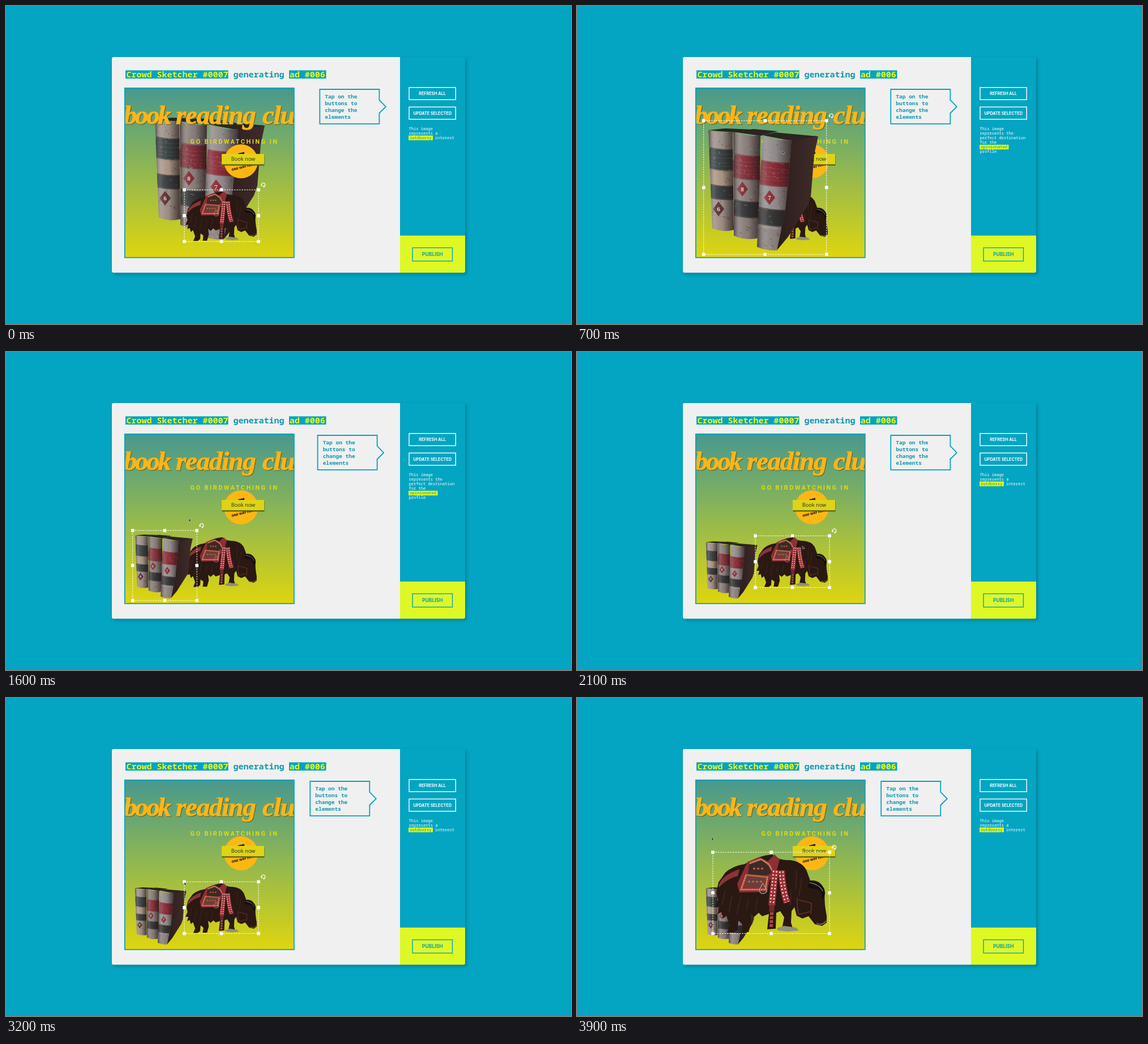
Write an HTML page that moves like this. It is 998x561 px and loops after 4900 ms.

```html
<!DOCTYPE html>
<html lang="en">
<head>
<meta charset="utf-8">
<title>Ad generator</title>
<style>
  html, body { margin: 0; width: 100%; height: 100%; overflow: hidden; background: #03a5c2; }
  svg { display: block; width: 998px; height: 561px; }
  .mono { font-family: "Noto Sans Mono", monospace; }
  .head { font-size: 15px; font-weight: 700; }
  .tip { font-size: 9.5px; font-weight: 700; fill: #1298ad; }
  .note { font-size: 7.1px; fill: #fff; }
  .ui { font-family: Inter, sans-serif; font-size: 7.2px; font-weight: 700; fill: #fff; text-anchor: middle; }
  .script { font: italic 700 47px "Liberation Serif", serif; fill: #fbb51a; stroke: #fbb51a; stroke-width: 1;
    letter-spacing: -1.2px; filter: drop-shadow(1.2px 1.3px 0 #55622a); }
  .sub { font: 700 11px Roboto, sans-serif; letter-spacing: 2.43px; fill: #e0d913; }
  .cta { font: 400 9.2px "Open Sans", sans-serif; fill: #26301c; text-anchor: middle; }
  .num { font: 700 11px "Liberation Serif", serif; fill: #e8dcd2; text-anchor: middle; }
  .panel { filter: drop-shadow(3px 3px 2.5px rgba(0, 40, 50, .28)); }
  .line { fill: none; stroke: #03a3bf; }
</style>
</head>
<body>
<svg viewBox="0 0 998 561">
  <defs>
    <linearGradient id="sky" x2="0" y2="1">
      <stop stop-color="#47988f"/><stop offset=".5" stop-color="#93b84f"/><stop offset="1" stop-color="#dfd50f"/>
    </linearGradient>
    <linearGradient id="shade">
      <stop stop-color="#1c1010" stop-opacity=".62"/><stop offset=".3" stop-color="#fff" stop-opacity=".08"/>
      <stop offset=".55" stop-color="#1c1010" stop-opacity=".06"/><stop offset="1" stop-color="#1c1010" stop-opacity=".72"/>
    </linearGradient>
    <linearGradient id="cover"><stop stop-color="#2b1c1b"/><stop offset="1" stop-color="#402d2a"/></linearGradient>
    <clipPath id="frame"><path d="M210 145H508V443H210Z"/></clipPath>
  </defs>

  <g class="panel">
    <rect x="187" y="90" width="624" height="380.5" rx="3" fill="#03a5c2"/>
    <path d="M190 90H696V470.5H190Q187 470.5 187 467.5V93Q187 90 190 90Z" fill="#f0f0f0"/>
    <path d="M696 405H811V467.5Q811 470.5 808 470.5H696Z" fill="#def826"/>
  </g>

  <g class="mono head">
    <path d="M211 113.5H392.5V128H211ZM500 113.5H565.5V128H500Z" fill="#03a3bf"/>
    <text x="212.5" y="126" fill="#e6fa1e">Crowd Sketcher #0007</text>
    <text x="401.5" y="126" fill="#1298ad">generating</text>
    <text x="500.7" y="126" fill="#e6fa1e">ad #006</text>
  </g>

  <g id="tip">
    <path class="line" stroke-width="1.8" d="M.9 147H106V166L117.5 177.7L106 189V207.8H.9Z"/>
    <g class="mono tip">
      <text x="10" y="163">Tap on the</text><text x="10" y="175">buttons to</text>
      <text x="10" y="187">change the</text><text x="10" y="199">elements</text>
    </g>
  </g>

  <g fill="none" stroke="#fff" stroke-width="1.4">
    <rect x="712" y="143.7" width="82.3" height="21.6"/><rect x="712" y="178.2" width="82.3" height="21.6"/>
    <rect x="718" y="426.5" width="70.5" height="23.5" stroke="#03a3bf"/>
  </g>
  <text class="ui" x="753" y="157.3">REFRESH ALL</text>
  <text class="ui" x="753.3" y="191.8">UPDATE SELECTED</text>
  <text class="ui" x="753.3" y="441.4" style="font-size:8.5px;fill:#0d9fae">PUBLISH</text>

  <g class="mono note">
    <text x="711.5" y="218.5">This image</text>
    <g id="noteYak">
      <text x="711.5" y="226.7">represents a</text>
      <path d="M711 228.5H754V236.8H711Z" fill="#e2fa1c"/>
      <text x="713.3" y="234.9" fill="#178f80">outdoorsy</text><text x="757.7" y="234.9">interest</text>
    </g>
    <g id="noteBooks">
      <text x="711.5" y="226.7">represents the</text><text x="711.5" y="234.9">perfect destination</text>
      <text x="711.5" y="243">for the</text>
      <path d="M711 244.8H762.5V253H711Z" fill="#e2fa1c"/>
      <text x="713.3" y="251.2" fill="#178f80">opinionated</text><text x="711.5" y="259.3">profile</text>
    </g>
  </g>

  <g clip-path="url(#frame)">
    <rect x="209" y="144" width="300" height="300" fill="url(#sky)"/>
    <g id="layers">
      <g id="copy">
        <g class="script">
          <text x="208" y="208" style="letter-spacing:-3.4px">book</text>
          <text x="300" y="208">reading</text><text x="453" y="208">club</text>
        </g>
        <text class="sub" x="325.5" y="242.5">GO BIRDWATCHING IN</text>
        <circle cx="415" cy="274" r="30" fill="#fdb714"/>
        <path d="M410 260L421 257.5L421 262H410Z" fill="#2a2112"/>
        <text transform="translate(399 291) rotate(-14)" style="font:800 5.6px 'Open Sans',sans-serif" fill="#2a2112">ONE WAY FARE</text>
        <path d="M381.5 263H456.5V281.5H381.5Z" fill="#5f6015"/>
        <path d="M381 261H456V279.3H381Z" fill="#dfd318"/>
        <text class="cta" x="419" y="273.3">Book now</text>
      </g>
      <g id="books"></g>
      <g id="yak">
        <path fill="#2a1813" d="M262 308Q275 296 296 293Q320 278 345 276Q357 287 376 286Q396 288 405 303L412 322Q426 320 434 332L438 343Q436 360 441 384L441 396L433 402L420 399L409 385L398 389L388 384L384 369L379 376L378 396L381 406L362 407L366 387L359 376L352 379L351 407L336 408L339 381L327 385L321 379L313 386L306 380L308 396L303 413L291 413L293 399L285 393L284 409L277 414L265 414L270 401L264 384L258 389L255 378L248 381L251 369L243 369L249 356L246 343L250 325Z"/>
        <path fill="none" stroke="#4a2f25" stroke-width="1" d="M262 338L256 366M274 348L268 379M289 351L282 382M303 354L299 374M319 352L315 376M388 303L386 339M397 317L392 350M378 338L377 366"/>
        <path fill="#8e8f7d" d="M353 406L366 402L387 405L392 410L372 412L355 410Z"/>
        <path fill="#12100f" d="M411 324Q430 325 437 337Q440 350 432 356Q434 344 425 337Q415 337 407 333Z"/>
        <path fill="none" stroke="#8c7468" stroke-width="1.4" d="M423 397Q432 403 440 393M411 326Q429 329 434 341"/>
        <path fill="none" stroke="#6d302d" stroke-width="1.5" d="M389 352Q388 369 392 382M391 356L414 362L413 381M391 382L411 377"/>
        <path fill="#8b3436" d="M250 331Q255 313 287 302L284 314Q264 319 251 334Z"/>
        <path fill="#8d2f34" d="M301 289L322 281L337 288L349 276L358 285L351 311L340 322L336 342L287 343L283 328Z"/>
        <path fill="#3b2a25" d="M304 294L326 286L338 296L345 308L334 313L302 311Z"/>
        <path fill="none" stroke="#b4654a" stroke-width="3" d="M305 291L325 284L339 293L347 309M299 312L290 338H333L336 316Z"/>
        <path fill="none" stroke="#e0c7a5" stroke-width="1.1" stroke-dasharray="2 2.2" d="M306 292L325 285L339 294L347 309M298 313L289 338H333L337 315"/>
        <path fill="#61423a" d="M301 317H332L329 332H296Z"/>
        <path fill="none" stroke="#c85a45" stroke-width="3" stroke-dasharray="4 3" d="M302 324H328M311 301H329"/>
        <g fill="none">
          <path stroke="#9d3038" stroke-width="12" d="M350 303Q347 336 344 366M361 304Q363 337 371 361"/>
          <path stroke="#e9d9c9" stroke-width="8" stroke-dasharray="2.5 3.5" d="M350 305Q347 336 344 364M361 306Q363 337 371 360"/>
          <path stroke="#9d3038" stroke-width="3" d="M350 305Q347 336 344 364M361 306Q363 337 371 360"/>
          <path stroke="#702a2c" stroke-width="9" d="M344 366V377"/>
          <path stroke="#a54a48" stroke-width="6" stroke-dasharray="5 2" d="M344 378L343 404"/>
          <path stroke="#a99b8d" stroke-width="1.3" d="M328 327L322 338Q322 345 329 345Q336 344 335 338Z"/>
        </g>
      </g>
    </g>
    <g id="pick"></g>
    <path id="cursor" d="M0 0V5.2L1.4 4L2.4 6L3.4 5.5L2.4 3.6H4.2Z" fill="#1c1c1c" stroke="#ddd" stroke-width=".5"/>
  </g>
  <rect class="line" x="209.8" y="144.8" width="299" height="299" stroke-width="1.8"/>
</svg>

<script>
const LOOP = 4900, STEP = 100, LAST = 39;
const el = id => document.getElementById(id);

let seed = 7;
const rand = () => (seed = seed * 16807 % 2147483647) / 2147483647;

// Each spine: outline, left, width, slope, [digit, x, y], bands of [middle, height, colour]
const spines = [
  { d: "M232 219Q252 225 275 222L277 395Q258 400 239 392Z", top: "M232 219L262 216L312 218L276 223Z",
    x: 230, w: 50, slope: 4, mark: [6, 250, 358], base: "#a0958e", red: "#5f3436",
    bands: [[270, 38, "#3a4445"], [303, 28, "#b09a88"], [328, 25, "#3b3f42"], [384, 30, "#a39287"]] },
  { d: "M276 222Q297 230 324 228L322 409Q300 415 277 405Z", top: "M276 222L312 217L355 221L324 229Z",
    x: 274, w: 52, slope: 5, mark: [8, 292, 323], base: "#8c817d", red: "#7f2b33",
    bands: [[283, 43, "#84303a"], [357, 29, "#343536"], [394, 40, "#8b7f7a"]] },
  { d: "M328 228Q350 238 379 236L374 300L368 360L353 431Q334 432 318 425L322 320Z", top: "M328 228L350 223L426 230L379 238Z",
    x: 316, w: 66, slope: 6, mark: [7, 340, 338], base: "#979090", red: "#8b2a33",
    bands: [[294, 43, "#8a2c37"], [371, 30, "#333333"], [413, 42, "#8d8380"]] }
];

const arc = (s, y) => `M${s.x} ${y}q${s.w / 2} ${s.slope + 3} ${s.w} ${s.slope}`;

// Worn leather: short pale and dark scuffs
const scuffs = s => Array.from({ length: 90 }, (_, i) =>
  `<path d="M${(s.x + rand() * s.w).toFixed(1)} ${(218 + rand() * 212).toFixed(1)}l${(1 + rand() * 4).toFixed(1)} ${(rand() * 3).toFixed(1)}"
    stroke="${i % 2 ? "#2a1f1e" : "#d8cbc2"}" stroke-opacity=".3" stroke-width="1.4"/>`).join("");

function spine(s, i) {
  const [digit, cx, cy] = s.mark;
  const bands = s.bands.map(([y, h, c]) =>
    `<path d="${arc(s, y - 3)}" stroke="${c}" stroke-width="${h}"/>` +
    `<path d="${arc(s, y - h / 2 - 2)}${arc(s, y + h / 2 - 4)}" stroke="#8a7767" stroke-opacity=".5"/>`).join("");
  const labels = [-10, -3, 5, 11].map(o =>
    `<path d="${arc(s, s.bands[0][0] + o - 3)}" stroke="#c5a793" stroke-opacity=".28" stroke-dasharray="2 1.5 4 1"/>`).join("");
  return `<clipPath id="spine${i}"><path d="${s.d}"/></clipPath>
    <path d="${s.top}" fill="#2b2422"/>
    <g clip-path="url(#spine${i})"><path d="${s.d}" fill="${s.base}"/>
    <g fill="none">${bands}${labels}${scuffs(s)}</g>
    <path d="M${cx} ${cy - 13}l10 13l-10 13l-10 -13z" fill="${s.red}"/>
    <path d="${s.d}" fill="url(#shade)"/></g>
    <text class="num" x="${cx}" y="${cy + 4}">${digit}</text>`;
}

el("books").innerHTML = spine(spines[0], 0) + spine(spines[1], 1) +
  `<path d="M376 236L385 227L426 230L419 262L413 336L407 353L373 407L353 431Z" fill="url(#cover)"/>` + spine(spines[2], 2);

// Motion tables: time in ms, then values
const bookMove = [[200, 31, -19, 1], [500, 0, 0, 1], [1100, 0, 0, 1], [1300, 0, 0, .903], [1600, 0, 0, .523], [1800, 0, 0, .468]];
const yakMove = [[3300, 1], [3500, 1.15], [3700, 1.45], [3900, 1.5725]];
const mouse = [[200, 325, 281], [500, 294, 300], [900, 431, 211], [1100, 431, 211], [1300, 409, 231], [1600, 323, 294],
  [1800, 312, 304], [2000, 398, 342], [2500, 398, 342], [3000, 315, 325], [3300, 315, 325], [3900, 238, 246]];

function track(keys, t) {
  const i = keys.findIndex(k => k[0] > t);
  if (i === 0) return keys[0].slice(1);
  if (i < 0) return keys[keys.length - 1].slice(1);
  const a = keys[i - 1], b = keys[i], p = (t - a[0]) / (b[0] - a[0]);
  return a.slice(1).map((v, n) => v + (b[n + 1] - v) * p);
}

const about = (x, y, s) => `translate(${x} ${y}) scale(${s}) translate(${-x} ${-y})`;

function selection(x, y, w, h) {
  let dots = "";
  for (const u of [0, .5, 1]) for (const v of [0, .5, 1])
    if (u !== .5 || v !== .5) dots += `M${x + u * w - 2.8} ${y + v * h - 2.8}h5.6v5.6h-5.6z`;
  const cx = x + w + 8.5, cy = y - 9;
  return `<rect x="${x}" y="${y}" width="${w}" height="${h}" fill="none" stroke="#fff" stroke-dasharray="2.6 1.8"/>
    <path d="${dots}" fill="#fff"/>
    <path d="M${cx - 3} ${cy + 1}a3.2 3.2 0 1 1 4.2 2" fill="none" stroke="#fff" stroke-width="1.2"/>
    <path d="M${cx - 5} ${cy}h4l-2 3zM${cx + 2} ${cy + 1.2}v4l-3 -2z" fill="#fff"/>`;
}

function draw(t) {
  const booksOn = t >= 200 && t < 2000;
  const [bx, by, bs] = track(bookMove, t);
  const [ys] = track(yakMove, t);
  const order = t < 200 ? ["books", "copy", "yak"] : booksOn ? ["copy", "yak", "books"] : ["copy", "books", "yak"];
  el("layers").append(...order.map(el));
  el("books").setAttribute("transform", `translate(${bx} ${by}) ${about(224, 438, bs)}`);
  el("yak").setAttribute("transform", about(446, 415.5, ys / 1.5725));
  el("pick").innerHTML = booksOn
    ? selection(223.7 + bx, 438.3 + by - 236 * bs, 217 * bs, 236 * bs)
    : selection(446 - 131 * ys, 415.5 - 91.2 * ys, 131 * ys, 91.2 * ys);
  el("noteBooks").style.display = booksOn ? "" : "none";
  el("noteYak").style.display = booksOn ? "none" : "";
  el("cursor").setAttribute("transform", `translate(${track(mouse, t)})`);
  const sway = 545.7 + 9.6 * Math.cos(2 * Math.PI * (t - 72) / 700);
  el("tip").setAttribute("transform", `translate(${sway})`);
}

const start = performance.now();
let shown = -1;
function tick() {
  const n = Math.min(LAST, Math.floor((performance.now() - start) % LOOP / STEP));
  if (n !== shown) draw((shown = n) * STEP);
  requestAnimationFrame(tick);
}
tick();
</script>
</body>
</html>
```
